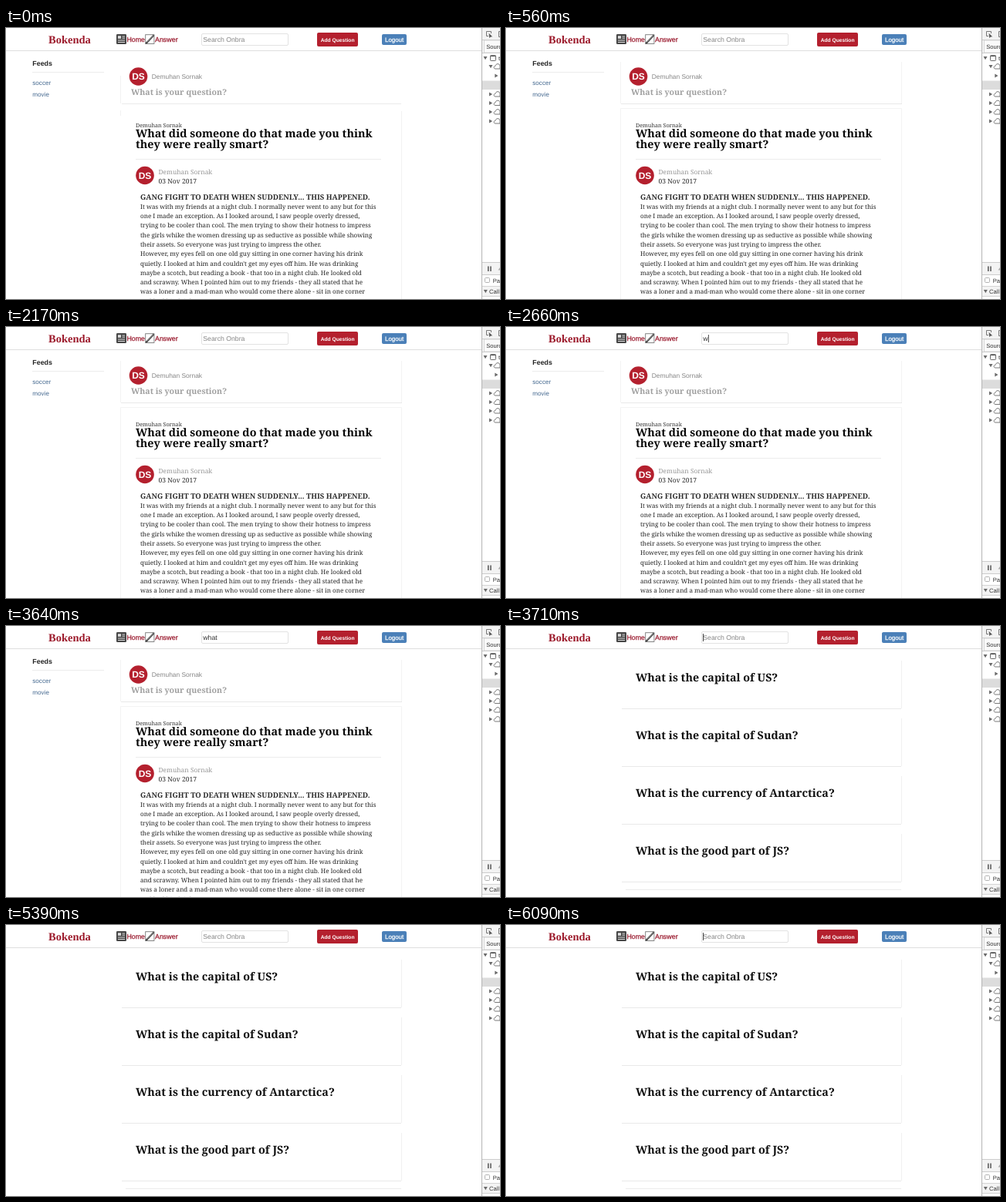
An HTML page that plays this animation: 640x352 px, repeating every 6.16 s.

```html
<!DOCTYPE html>
<html lang="en">
<head>
<meta charset="utf-8">
<title>Question search</title>
<style>
html, body { margin: 0; width: 100%; height: 100%; overflow: hidden; background: #fff; }
svg { display: block; width: 640px; height: 352px; text-rendering: geometricPrecision; }
text { white-space: pre; }
.sans { font-family: "Liberation Sans", Arial, sans-serif; }
.serif { font-family: "Noto Serif", Georgia, serif; }
.brand { font-family: "Liberation Serif", Times, serif; }
.b { font-weight: 700; }
</style>
</head>
<body>
<svg id="stage" viewBox="0 0 640 352" xmlns="http://www.w3.org/2000/svg">
  <rect width="640" height="352" fill="#fff"/>
  <g id="article"></g>
  <g id="results"></g>
  <g id="header"></g>
  <g id="tools"></g>
</svg>
<script>
const LOOP = 6160;
const RED = "#b4202e";
const USER = "Demuhan Sornak", INITIALS = "DS";
const HINT = "Search Onbra";
const TITLE_SIZE = 14.3;
const byId = id => document.getElementById(id);

function add(parent, tag, attrs) {
  const el = document.createElementNS("http://www.w3.org/2000/svg", tag);
  for (const key in attrs) el.setAttribute(key, attrs[key]);
  parent.appendChild(el);
  return el;
}
function label(parent, str, x, y, size, fill, cls = "sans", more = {}) {
  const el = add(parent, "text", { x, y, "font-size": size, fill, class: cls, ...more });
  el.textContent = str;
  return el;
}
function box(parent, x, y, width, height, fill, more = {}) {
  return add(parent, "rect", { x, y, width, height, fill, ...more });
}
function path(parent, d, stroke, width = 1, fill = "none") {
  return add(parent, "path", { d, stroke, fill, "stroke-width": width });
}

// Header
const header = byId("header");
path(header, "M0 29.5H616", "#dedede");
label(header, "Bokenda", 55, 20, 14.5, "#9c1a2b", "brand b");
box(header, 143, 8, 13, 13, "#474747", { rx: 1.2 });
box(header, 145, 10.2, 4, 3.6, "#ddd");
path(header, "M150.5 11H154M150.5 13.2H154M145 16H154M145 18.5H154", "#ddd", 1);
const nav = { stroke: "#9b1c30", "stroke-width": 0.25 };
label(header, "Home", 156.5, 18, 8.8, "#9b1c30", "sans", nav);
box(header, 180.7, 8.7, 11.2, 11.8, "#fff", { stroke: "#777", "stroke-width": 0.9 });
path(header, "M182 19.4L191.6 9.2", "#444", 2.2);
path(header, "M182.6 18.2L190.8 9.6", "#ddd", 0.6);
path(header, "M180.6 20.8L181.6 18.2L183.2 19.8Z", "none", 0, "#333");
label(header, "Answer", 193, 18, 8.9, "#9b1c30", "sans", nav);
box(header, 253.5, 7.5, 112, 15, "#fff", { rx: 1.5, stroke: "#e2e2e2" });
const field = label(header, HINT, 255.3, 18, 8.7, "#858585");
const caret = box(header, 255, 10, 0.9, 10, "#333");
box(header, 403, 6, 53, 18, RED, { rx: 2 });
label(header, "Add Question", 407.7, 18, 6.7, "#fff", "sans b");
box(header, 487, 8, 32, 14, "#4b80b8", { rx: 2 });
label(header, "Logout", 491, 17.6, 7.9, "#fff", "sans", { stroke: "#fff", "stroke-width": 0.25 });

// Article page
const article = byId("article");
label(article, "Feeds", 34.3, 49, 8.9, "#252525", "sans b");
path(article, "M34 57.5H127", "#ececec");
label(article, "soccer", 34.3, 74, 8.1, "#44688f");
label(article, "movie", 34.3, 89, 8.1, "#44688f");

const faintEdges = add(article, "g", {});
path(faintEdges, "M148.5 62V98M148.5 107V114M512.5 108V352", "#f2f2f2");
path(faintEdges, "M150 98.5H512", "#ebebeb");
const edges = add(article, "g", {});
path(edges, "M148.5 44V98M512.5 44V98M148.5 352V104.5H512.5V352", "#f3f3f3");
path(edges, "M149 98.5H513", "#e8e8e8");

function avatar(cx, cy) {
  add(article, "circle", { cx, cy, r: 11.8, fill: RED });
  label(article, INITIALS, cx, cy + 4.2, 12, "#fff", "sans b", { "text-anchor": "middle" });
}
avatar(171.5, 63);
label(article, USER, 188.8, 66.3, 8.4, "#858585");
label(article, "What is your question?", 162, 87, 10.6, "#a0a0a0", "serif b");
label(article, USER, 168, 129.3, 7.2, "#333", "serif");
label(article, "What did someone do that made you think", 168, 142, TITLE_SIZE, "#080808", "serif b");
label(article, "they were really smart?", 168, 156, TITLE_SIZE, "#080808", "serif b");
path(article, "M168 170.5H486", "#ececec");
avatar(180, 191.5);
label(article, USER, 197.5, 189.6, 8.4, "#969696", "serif");
label(article, "03 Nov 2017", 197.5, 202, 8.55, "#2b2b2b", "serif");
label(article, "GANG FIGHT TO DEATH WHEN SUDDENLY... THIS HAPPENED.", 174, 222.8, 9.5, "#2b2b2b", "serif b");
[
  "It was with my friends at a night club. I normally never went to any but for this",
  "one I made an exception. As I looked around, I saw people overly dressed,",
  "trying to be cooler than cool. The men trying to show their hotness to impress",
  "the girls whike the women dressing up as seductive as possible while showing",
  "their assets. So everyone was just trying to impress the other.",
  "However, my eyes fell on one old guy sitting in one corner having his drink",
  "quietly. I looked at him and couldn't get my eyes off him. He was drinking",
  "maybe a scotch, but reading a book - that too in a night club. He looked old",
  "and scrawny. When I pointed him out to my friends - they all stated that he",
  "was a loner and a mad-man who would come there alone - sit in one corner",
  "and had his drinks."
].forEach((line, i) => label(article, line, 174, 234.9 + 12.27 * i, 8.1, "#242424", "serif"));

// Search results
const results = byId("results");
["capital of US", "capital of Sudan", "currency of Antarctica", "good part of JS"].forEach((topic, i) => {
  const y = 75 * i;
  label(results, `What is the ${topic}?`, 168, 72.3 + y, TITLE_SIZE, "#101010", "serif b");
  path(results, `M512.5 ${45 + y}V${107 + y}`, "#f0f0f0");
  path(results, `M150 ${107.5 + y}H512`, "#e9e9e9");
});
path(results, "M155 342.5H512", "#ececec");

// Developer tools at the right edge
const tools = byId("tools");
const INK = "#6a6a6a";
function arrow(x, y, open) {
  const d = open ? `M${x - 2.5} ${y - 2}h5l-2.5 4.2z` : `M${x - 2} ${y - 2.5}v5l4.2 -2.5z`;
  path(tools, d, "none", 0, INK);
}
function cloud(y) {
  path(tools, `M634 ${y + 3}c-2.6 0 -2.4 -3.6 0 -3.6c.6 -3.6 5.4 -3.6 6 -.4V${y + 3}Z`, INK, 0.9, "#fff");
}
box(tools, 616, 0, 24, 352, "#fff");
box(tools, 616, 0, 24, 32, "#f3f3f3");
path(tools, "M616 15.5H640M616 32.5H640", "#ccc");
path(tools, "M628.5 7V4.5H622.5V10.5H625", INK, 0.9);
path(tools, "M625.6 6.8L630.2 11.2L627.8 11.4L626.2 13Z", "none", 0, "#555");
path(tools, "M640 4.5H638.5V11.5H640", INK, 0.9);
box(tools, 619.5, 16, 21, 16, "#fafafa", { stroke: "#d0d0d0", "stroke-width": 0.8 });
label(tools, "Sources", 622.3, 27, 7.6, "#333");
arrow(621, 39, true);
box(tools, 627.5, 35.5, 7, 7, "#fff", { rx: 0.8, stroke: INK });
path(tools, "M627.5 36.6H634.5", INK, 1.2);
label(tools, "top", 638, 42, 7.6, "#333");
arrow(628, 50, true);
cloud(50);
arrow(635.3, 62, false);
box(tools, 617, 68.5, 23, 11.5, "#dcdcdc");
[86, 97.5, 109, 121].forEach(y => { arrow(628, y, false); cloud(y); });
box(tools, 616, 304, 24, 16, "#f3f3f3");
path(tools, "M616 304.5H640M616 320.5H640", "#ccc");
path(tools, "M624.8 309.5V316M628 309.5V316", "#555", 1.5);
path(tools, "M637.5 314.5L640 311V314.5Z", "none", 0, "#aaa");
box(tools, 620.5, 324.5, 6, 6, "#fff", { rx: 1, stroke: "#aaa", "stroke-width": 0.9 });
label(tools, "Pause", 630.8, 330.5, 7.6, "#333");
box(tools, 616, 336, 24, 12, "#f3f3f3");
path(tools, "M616 335.5H640M616 348.5H640", "#d4d4d4");
arrow(621.3, 342, true);
label(tools, "Call Stack", 626, 345, 7.6, "#333");
path(tools, "M616.5 0V352", "#b5b5b5");

// Times in ms: search sent, keystrokes, caret visible spans
const SENT = 3710;
const KEYS = [2520, 2730, 2940, 3140];
const CARET = [[1400, 1890], [2380, 3640], [SENT, 4130], [4620, 5180], [5670, LOOP]];

function show(el, on) {
  el.setAttribute("display", on ? "inline" : "none");
}

function draw(t) {
  const sent = t >= SENT;
  show(article, !sent);
  show(results, sent);
  show(faintEdges, t < 70);
  show(edges, t >= 70);

  const typed = sent ? "" : "what".slice(0, KEYS.filter(k => t >= k).length);
  field.textContent = typed || HINT;
  field.setAttribute("fill", typed ? "#333" : "#858585");
  caret.setAttribute("x", typed ? 255.6 + field.getComputedTextLength() : 255);
  show(caret, CARET.some(([from, to]) => t >= from && t < to));
}

const start = performance.now();
function tick() {
  draw((performance.now() - start) % LOOP);
  requestAnimationFrame(tick);
}
tick();
</script>
</body>
</html>
```
